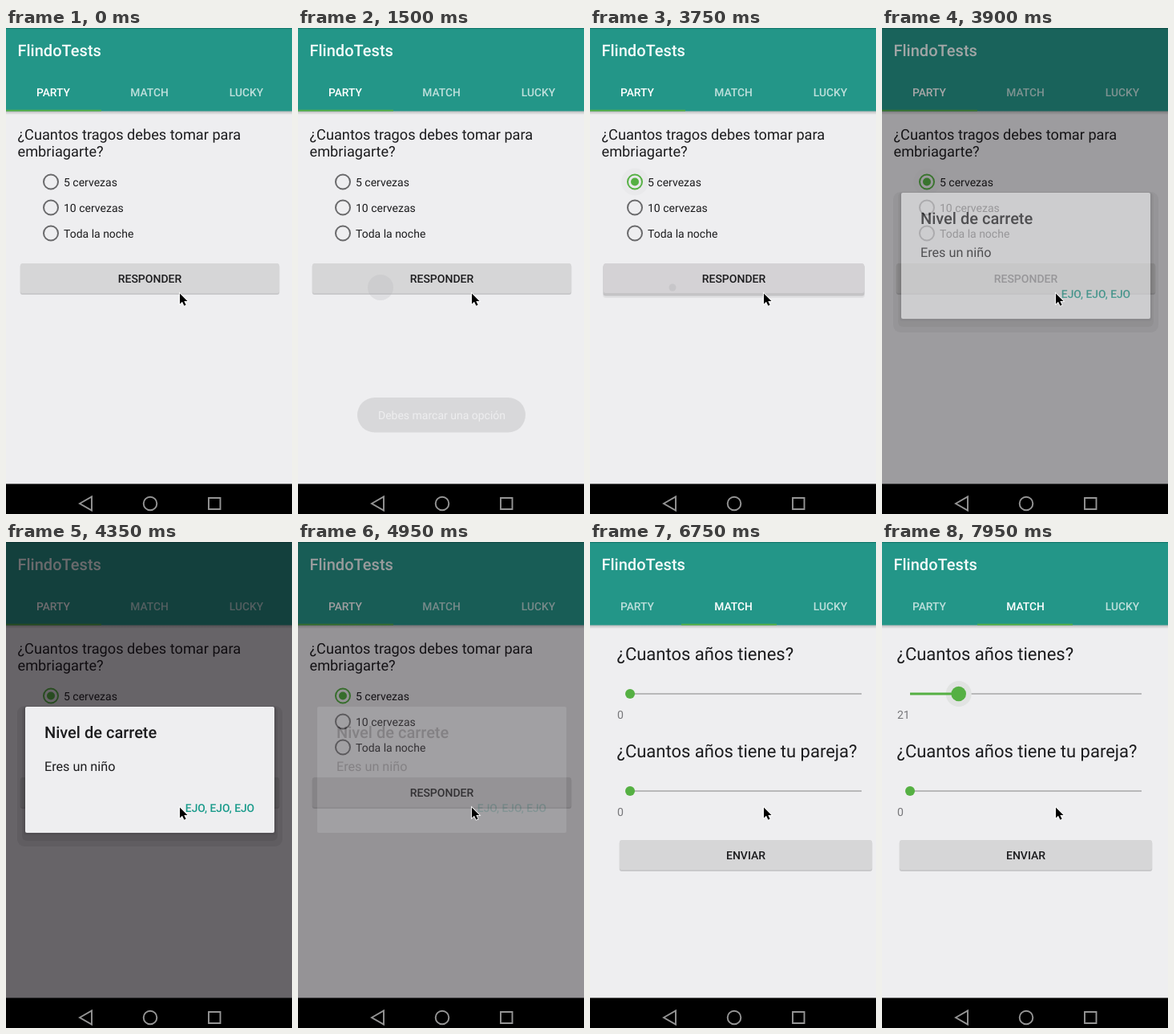
An HTML page for the animation above (8 s loop, 357 by 605 pixels).

```html
<!DOCTYPE html>
<html lang="es">
<head>
<meta charset="utf-8">
<title>Quiz</title>
<style>
  html, body { margin: 0; height: 100%; overflow: hidden; background: #eeeef0; }
  svg { display: block; width: 100vw; height: 100vh; }
  text { font: 14px Roboto, Arial, sans-serif; fill: #1c1c1e; text-rendering: geometricPrecision; }
  .bold { font-weight: 500; }
  .mid { text-anchor: middle; }
  .tab { fill: #fff; font-size: 13.8px; }
  .q1 { font-size: 18.2px; }
  .q2 { font-size: 22px; }
  .num { fill: #77777a; }
  .ring { fill: none; stroke: #69696b; stroke-width: 2; }
  .green { fill: #55b043; }
  .track { stroke: #a6a6a8; stroke-width: 1.4; }
  .nav { fill: none; stroke: #959595; stroke-width: 1.9; }
</style>
</head>
<body>
<svg viewBox="0 0 357 605">
  <rect width="357" height="605" fill="#eeeef0"/>

  <g id="party">
    <text class="q1" x="14.5" y="139">¿Cuantos tragos debes tomar para</text>
    <text class="q1" x="14.5" y="160">embriagarte?</text>
    <circle id="radioRipple" cx="56" cy="191.5" r="17"/>
    <circle id="ring" class="ring" cx="56" cy="191.5" r="9"/>
    <circle id="dot" cx="56" cy="191.5"/>
    <circle class="ring" cx="56" cy="223.5" r="9"/>
    <circle class="ring" cx="56" cy="255.5" r="9"/>
    <text x="72" y="197">5 cervezas</text>
    <text x="72" y="229">10 cervezas</text>
    <text x="72" y="261">Toda la noche</text>
    <g id="flatButton">
      <rect x="17.7" y="294" width="323.6" height="38" rx="3" fill="#c9c9cb"/>
      <rect x="18" y="293" width="323" height="37" rx="2.5" fill="#d6d6d7"/>
    </g>
    <g id="raisedButton">
      <rect x="16" y="295" width="327" height="41" rx="4" fill="#e0e0e2"/>
      <rect x="16.5" y="294" width="326" height="39.5" rx="3" fill="#c4c3c5"/>
      <rect x="17" y="293" width="325" height="37" rx="2.5" fill="#d4d2d5"/>
    </g>
    <circle id="tapRipple" cx="103" cy="323" fill="#b5b5b6"/>
    <text class="bold mid" x="179.5" y="317">RESPONDER</text>
  </g>

  <g id="match">
    <text class="q2" x="18.5" y="147">¿Cuantos años tienes?</text>
    <path class="track" d="M35 189H324M35 310H324"/>
    <circle id="halo" cy="189" r="16" fill="#e1e3e2"/>
    <path id="progress" stroke="#55b043" stroke-width="3"/>
    <circle id="thumb" class="green" cy="189"/>
    <text id="age" class="num" x="19" y="220"></text>
    <text class="q2" x="18.5" y="268">¿Cuantos años tiene tu pareja?</text>
    <circle class="green" cx="35" cy="310" r="6"/>
    <text class="num" x="19" y="341">0</text>
    <rect x="21.7" y="372" width="315.6" height="38" rx="3" fill="#c9c9cb"/>
    <rect x="22" y="371" width="315" height="37" rx="2.5" fill="#d6d6d7"/>
    <text class="bold mid" x="179.5" y="395">ENVIAR</text>
  </g>

  <linearGradient id="shade" x2="0" y2="1">
    <stop stop-color="#000" stop-opacity=".24"/>
    <stop offset="1" stop-color="#000" stop-opacity="0"/>
  </linearGradient>
  <rect y="103" width="357" height="5" fill="url(#shade)"/>
  <rect width="357" height="103.5" fill="#239688"/>
  <rect width="357" height="1.2" fill="#14796d"/>
  <text class="bold" x="14.5" y="35" style="font-size:20px;fill:#f4fbfa">FlindoTests</text>
  <text id="tabParty" class="tab bold mid" x="59" y="85">PARTY</text>
  <text id="tabMatch" class="tab bold mid" x="179" y="85">MATCH</text>
  <text class="tab bold mid" x="300" y="85" opacity=".7">LUCKY</text>
  <rect id="indicator" class="green" y="101.8" width="119" height="1.8"/>

  <g id="toast">
    <rect x="74" y="460" width="210" height="43.5" rx="21.75" fill="#636363"/>
    <text class="mid" x="179.5" y="487" style="fill:#ededed">Debes marcar una opción</text>
  </g>

  <rect id="dim" width="357" height="568" fill="#080308"/>
  <g id="dialog">
    <g id="dialogShadow" fill-opacity=".07">
      <rect x="14" y="204" width="331" height="175" rx="9"/>
      <rect x="20" y="204" width="319" height="168" rx="6"/>
      <rect x="22" y="205" width="315" height="160" rx="4"/>
    </g>
    <rect x="24" y="205" width="311" height="157" rx="2" fill="#eeeef0"/>
    <text class="bold" x="48" y="244" style="font-size:20px">Nivel de carrete</text>
    <text x="48" y="285" style="font-size:16.2px">Eres un niño</text>
    <text class="bold mid" x="267" y="335.5" style="fill:#1a9b8b;font-size:13.8px">EJO, EJO, EJO</text>
  </g>

  <rect y="567.5" width="357" height="38"/>
  <path class="nav" d="M92 592L107 583.5V600.5ZM253 585H267.5V599H253Z"/>
  <circle class="nav" cx="180" cy="592" r="8.3"/>
  <path d="M217 330.5v13l3-2.7 2.4 5 2.2-1-2.3-4.8h4.2z" stroke="#fff" stroke-width="1.6" paint-order="stroke"/>
</svg>
<script>
const LOOP = 8000, STEP = 150;
const $ = id => document.getElementById(id);
const set = (id, attrs) => {
  for (const k in attrs) $(id).setAttribute(k, attrs[k]);
};
const show = (id, opacity) => set(id, { opacity: +opacity });

// Linear interpolation through [time, value] points, flat outside them
function ramp(t, ...points) {
  let [t0, v0] = points[0];
  for (const [t1, v1] of points) {
    if (t < t1) return t <= t0 ? v0 : v0 + (v1 - v0) * (t - t0) / (t1 - t0);
    [t0, v0] = [t1, v1];
  }
  return v0;
}
const within = (t, a, b) => t >= a && t < b;

function drawRadio(t) {
  const filling = within(t, 2400, 2550), checked = t >= 2550;
  show('radioRipple', ramp(t, [2250, 0], [2400, .03], [2700, .05], [2850, .02], [3750, .02], [4050, 0]));
  set('ring', {
    r: filling ? 5.7 : 9,
    style: filling ? 'stroke-width:8' : checked ? 'stroke:#55b043' : ''
  });
  set('dot', {
    r: filling ? 1.5 : checked ? ramp(t, [2550, 4], [2850, 5]) : 0,
    fill: filling ? '#e4e4e6' : '#55b043'
  });
}

function drawButton(t) {
  const pressed = within(t, 3750, 3900);
  show('raisedButton', pressed);
  show('flatButton', !pressed);
  set('tapRipple', { r: t < 1500 || pressed ? 4.5 : 16 });
  show('tapRipple', pressed || within(t, 1350, 1500) ? .4 : within(t, 1500, 1650) ? .25 : 0);
}

function drawOverlays(t) {
  show('toast', t < 3000
    ? ramp(t, [1350, 0], [1500, .15], [1950, 1])
    : ramp(t, [3150, 1], [3300, .8], [3600, .15], [3750, 0]));
  show('dim', ramp(t, [3750, 0], [3900, .35], [4050, .58], [4800, .58], [4950, .39], [5100, 0]));
  show('dialog', ramp(t, [3750, 0], [3900, .6], [4050, 1], [4800, 1], [4950, .14], [5100, 0]));
  show('dialogShadow', t < 4950);
}

function drawPages(t) {
  const x = ramp(t, [6000, 0], [6150, 12], [6300, 85], [6450, 190], [6600, 290], [6750, 342], [6900, 357]);
  const onMatch = x > 178;
  set('party', { transform: `translate(${-x})` });
  set('match', { transform: `translate(${357 - x})` });
  set('indicator', { x: x / 3 });
  show('tabParty', onMatch ? .7 : 1);
  show('tabMatch', onMatch ? 1 : .7);
}

function drawSlider(t) {
  const age = t >= 7800 ? 21 : 0, x = 35 + age * 2.89;
  set('progress', { d: `M35 189H${x}` });
  set('thumb', { cx: x, r: ramp(t, [7650, 6], [7950, 9.3]) });
  set('halo', { cx: x });
  show('halo', ramp(t, [7800, 0], [7950, 1]));
  $('age').textContent = age;
}

function frame(now) {
  const t = Math.floor(now % LOOP / STEP) * STEP;
  for (const draw of [drawRadio, drawButton, drawOverlays, drawPages, drawSlider]) draw(t);
  requestAnimationFrame(frame);
}
frame(0);
</script>
</body>
</html>
```
